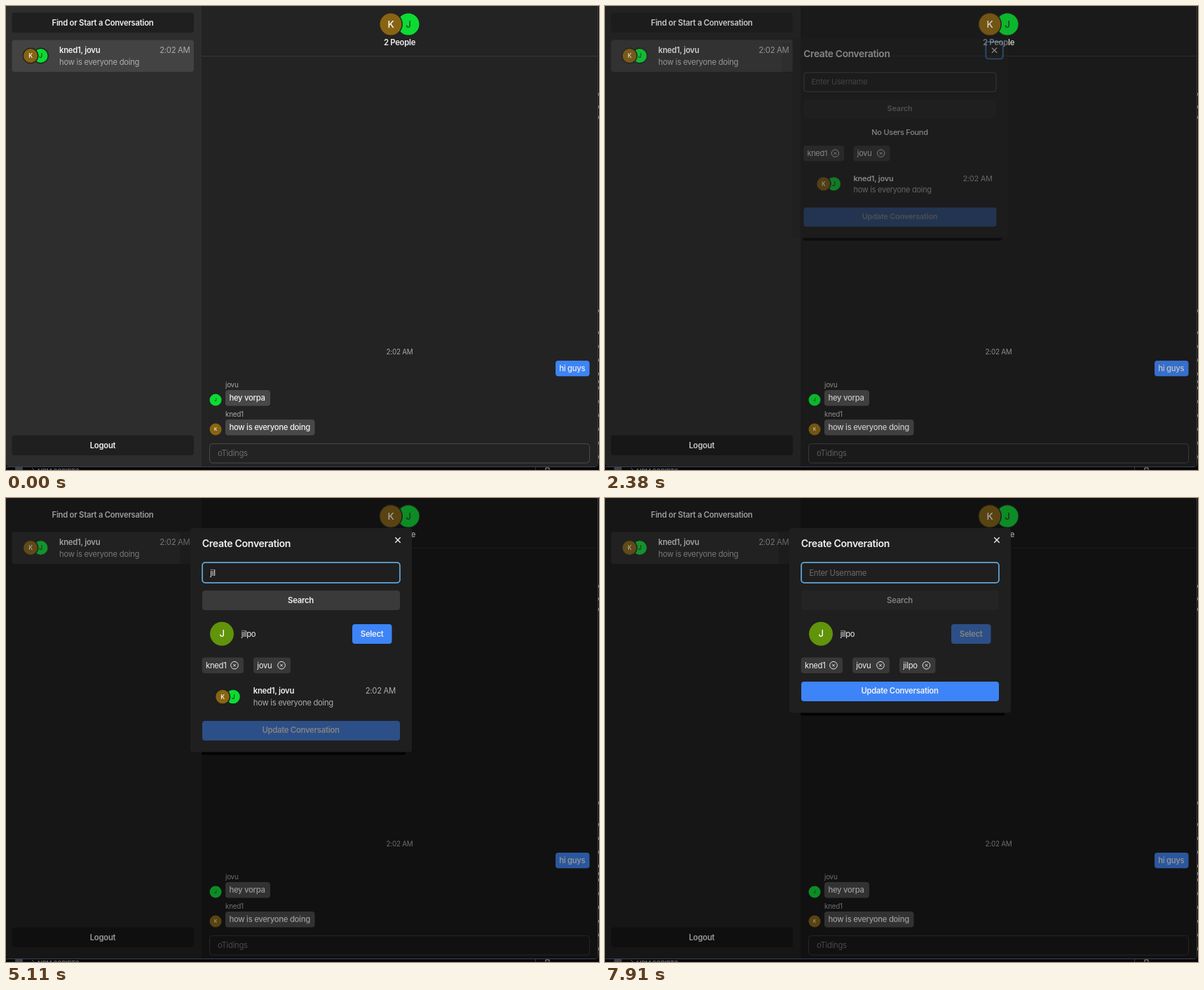
An HTML page for the animation above (8 s loop, 846 by 662 pixels).

```html
<!DOCTYPE html>
<html lang="en">
<head>
<meta charset="utf-8">
<title>Group chat</title>
<style>
  html, body { margin: 0; width: 100%; height: 100%; overflow: hidden; background: #08090d; }
  svg { display: block; width: 846px; height: 662px; }
  text { font: 400 11.28px Inter, "Open Sans", sans-serif; letter-spacing: -.025em; fill: #f0f0f0; white-space: pre; }
  .semi { font-weight: 600; letter-spacing: -.022em; }
  .medium { font-weight: 500; }
  .soft { fill: #adadad; }
  .hint { fill: #6c6c6c; }
  .small { font-size: 9.87px; fill: #a8a8a8; }
</style>
</head>
<body>
<svg id="stage" viewBox="0 0 846 662"></svg>
<script>
const LOOP = 8000, STEP = 70;
const BLUE = '#3d84f8', GREEN = '#0bdb32', BROWN = '#886412', PANEL = '#1f1f1f';
const FIRST = 'kned1', SECOND = 'jovu', THIRD = 'jilpo', QUERY = 'jil';
const GROUP = `${FIRST}, ${SECOND}`, LAST = 'how is everyone doing';

const rect = (x, y, w, h, fill, r = 4, more = '') =>
  `<rect x="${x}" y="${y}" width="${w}" height="${h}" rx="${r}" fill="${fill}" ${more}/>`;
const label = (x, y, str, cls = '', anchor = 'start', more = '') =>
  `<text x="${x}" y="${y}" class="${cls}" text-anchor="${anchor}" ${more}>${str}</text>`;
const centered = (x, y, str, cls = 'semi', more = '') => label(x, y, str, cls, 'middle', more);
const path = (d, stroke = '#f0f0f0', width = 1, more = '') =>
  `<path d="${d}" fill="none" stroke="${stroke}" stroke-width="${width}" ${more}/>`;
const group = (id, body, more = '') => `<g id="${id}" ${more}>${body}</g>`;
const cross = (x, y, r) => `M${x - r} ${y - r}l${2 * r} ${2 * r}m0 ${-2 * r}l${-2 * r} ${2 * r}`;

const avatar = (x, y, r, fill, letter, size, ink = '#fff', ring = 'none') =>
  `<circle cx="${x}" cy="${y}" r="${r}" fill="${fill}" stroke="${ring}" stroke-width="1.4"/>` +
  centered(x, y + size * .36, letter, 'medium', `style="font-size:${size}px;fill:${ink}"`);
const pair = (x, y, r, gap, size, ring, backInk = '#123d18') =>
  avatar(x + gap, y, r, GREEN, 'J', size, backInk, ring) + avatar(x, y, r, BROWN, 'K', size, '#fff', ring);

const summary = (x, y, right) =>
  label(x, y, GROUP, 'semi') + label(right, y, '2:02 AM', 'soft', 'end') + label(x, y + 17.2, LAST, 'soft');

const bubble = (y, name, message, width, face) =>
  label(313, y - 4, name, 'small') + rect(313, y, width, 22.5, '#484848') +
  label(318.5, y + 15.4, message, 'medium') + face;

const chip = (x, width, name) =>
  rect(x, 199.5, width, 22.5, '#383838') + label(x + 5.3, 214.6, name) +
  `<circle cx="${x + width - 13}" cy="210.7" r="5.3" fill="none" stroke="#e6e6e6"/>` +
  path(cross(x + width - 13, 210.7, 1.9), '#e6e6e6');

// Fragments of the desktop around the window
const edgeMarks = [126, 144, 159, 435, ...Array.from({ length: 10 }, (_, i) => 466 + i * 19.7), 536]
  .map(y => rect(845, y - 2, 1, 4, '#808080', 0)).join('');
const desktop = rect(0, 0, 846, 662, '#07080c', 0) + edgeMarks +
  rect(13, 658, 11, 4, '#3c4048', 1) + path('M37 659l3 3', '#666') +
  label(45, 666.5, 'NPM SCRIPTS', 'semi', 'start', 'style="font-size:9px;fill:#666a72"') +
  path('M755.5 658v4', '#333842') + path('M770 662v-3h5v3', '#999');

const surfaces =
  path('M0 657.5h840q4.5 0 4.5-5V0', '#36444d', 1) +
  '<path d="M0 0H279V657H5Q0 657 0 652Z" fill="#2d2d2d"/>' +
  '<path d="M279 0H844V652Q844 657 839 657H279Z" fill="#232323"/>' +
  path('M279 71.5H844', '#393939') +
  rect(8.5, 9.5, 259.5, 28.5, '#1f1f1f', 4, 'id="findBox"') +
  rect(8.5, 48.5, 259.5, 45.5, '#434343') +
  rect(8.5, 612.5, 259.5, 28.5, '#1f1f1f') +
  rect(290.5, 624.5, 542, 27.5, 'none', 4, 'stroke="#4a4a4a"');

const content =
  centered(138, 27.5, 'Find or Start a Conversation') + centered(138, 630.5, 'Logout') +
  pair(35, 71, 10.7, 14.5, 8.5, '#222') + summary(76, 67, 262.5) +
  pair(549, 26, 16.2, 25, 13.5, '#232323', '#174f20') + centered(561.5, 55.6, '2 People') +
  centered(561.5, 496.5, '2:02 AM', 'small') +
  rect(784, 506, 48.5, 22.3, BLUE) + label(789.3, 521.2, 'hi guys', 'medium') +
  bubble(548, SECOND, 'hey vorpa', 64, avatar(299, 562, 8.5, GREEN, 'J', 6, '#123d18')) +
  bubble(590, FIRST, LAST, 127.5, avatar(299, 604, 8.5, BROWN, 'K', 6)) +
  label(302, 642.4, 'oTidings', 'hint');

const menu =
  rect(8.5, 54, 162, 74, '#000', 14, 'opacity=".2"') +
  rect(9, 49.5, 157, 62, '#282828', 4, 'stroke="#585858"') +
  rect(9.5, 55, 156, 25.3, '#525252', 0, 'id="editHover"') +
  rect(9.5, 80.3, 156, 25.3, '#525252', 0, 'id="leaveHover"') +
  '<path d="M19 72l.7-2.8 5.1-5.1 2.1 2.1-5.1 5.1z" fill="#e8e8e8"/>' + path('M20.3 70.7l4.3-4.3', '#444', .8) +
  path('M19.5 90.5h7.4M21.8 90v-1.3h2.8v1.3M20.5 90.5v6.3h5.4v-6.3', '#e8e8e8', 1.1) +
  label(37, 71.8, 'Edit') + label(37, 97.2, 'Leave');

const modal =
  rect(248, 49, 15, 45, '#000', 0, 'opacity=".14"') +
  rect(279, 330, 291, 8.5, '#030303', 2, 'id="shade"') +
  rect(263, 43, 316, 291.5, PANEL, 4, 'id="dialog"') +
  label(279.7, 69.7, 'Create Converation', 'semi', 'start', 'style="font-size:14.1px"') +
  rect(546.5, 47.5, 25, 25, 'none', 4, 'id="closeRing" stroke="#3f78b8" stroke-width="2"') +
  path(cross(559, 60, 3.7), '#f4f4f4', 1.3) +
  rect(280.5, 92.5, 281, 28, 'none', 4, 'stroke="#565656"') +
  rect(280, 92, 282, 29, 'none', 4, 'id="focusRing" stroke="#63b3ed" stroke-width="1.5"') +
  label(291.3, 110.5, 'Enter Username', 'hint', 'start', 'id="hint"') +
  label(291.3, 110.5, '', '', 'start', 'id="typed"') +
  rect(292, 100, 1, 13, '#f0f0f0', 0, 'id="caret"') +
  rect(280, 132, 282, 28, '#3a3a3a', 4, 'id="searchBox"') +
  centered(420.5, 149.5, 'Search', 'semi', 'id="searchText"') +
  centered(420.5, 184, 'No Users Found', 'medium', 'id="empty"') +
  group('result',
    rect(280, 171, 282, 45, '#4c4c4c', 4, 'id="rowHover"') +
    avatar(308, 193.8, 17, '#61930b', 'J', 13) + label(335.8, 197.8, THIRD) +
    group('select', rect(494, 180, 56.5, 28, BLUE) + centered(522.2, 197.5, 'Select'))) +
  group('chips', chip(279.7, 59.3, FIRST) + chip(353, 53, SECOND) + group('newChip', chip(420, 51.5, THIRD))) +
  group('preview', pair(309, 255.5, 10.5, 15, 8.5, PANEL) + summary(352.8, 251.2, 556)) +
  group('update', rect(280, 290, 282, 28, BLUE) + centered(420.5, 307.4, 'Update Conversation'));

const stage = document.getElementById('stage');
stage.innerHTML = desktop + surfaces +
  rect(0, 0, 844, 657, '#000', 4, 'id="backdrop"') +
  group('content', content) + group('menu', menu) + group('modal', modal);

const el = {};
stage.querySelectorAll('[id]').forEach(node => el[node.id] = node);

const ramp = (t, from, span = 210) => {
  const p = Math.min(1, Math.max(0, (t - from) / span));
  return p * p * (3 - 2 * p);
};
const within = (t, from, to) => t >= from && t < to;
const fade = (id, value) => el[id].setAttribute('opacity', value);
const show = (id, on) => fade(id, on ? 1 : 0);
const shift = (id, y) => el[id].setAttribute('transform', `translate(0 ${y})`);
const zoom = (id, x, y, k) =>
  el[id].setAttribute('transform', `translate(${x} ${y}) scale(${k}) translate(${-x} ${-y})`);

function draw(t) {
  // Context menu
  const opened = ramp(t, 840);
  fade('menu', opened * (1 - ramp(t, 2100)));
  zoom('menu', 9, 49, .8 + .2 * opened);
  show('leaveHover', t < 1190);
  fade('editHover', ramp(t, 1750, 140));

  // Dialog and dimmed page
  const dim = ramp(t, 2240, 280);
  fade('backdrop', .5 * dim);
  fade('content', 1 - .39 * dim);
  fade('findBox', 1 - dim);
  fade('modal', dim);
  zoom('modal', 421, 188, .95 + .05 * dim);

  // Search field
  const focus = ramp(t, 3220) - ramp(t, 6020, 280) + ramp(t, 7210, 280);
  fade('closeRing', 1 - ramp(t, 3220));
  fade('focusRing', focus);
  const count = t < 3990 || t >= 6720 ? 0 : t < 4200 ? 1 : t < 4550 ? 2 : 3;
  el.typed.textContent = QUERY.slice(0, count);
  show('hint', !count);
  el.caret.setAttribute('x', count ? 291.3 + el.typed.getComputedTextLength() : 292);
  show('caret', within(t, 3290, 3850) || within(t, 3990, 5050) || within(t, 5600, 6090) || within(t, 7280, 7840));
  const ready = ramp(t, 3920) - ramp(t, 6650);
  fade('searchBox', .2 + .8 * ready);
  fade('searchText', .45 + .55 * ready);

  // Search result, chips and update button
  const found = t >= 4900, picked = t >= 6720;
  const push = found ? 28 : 0, pull = picked ? 56 : 0;
  show('empty', !found);
  show('result', found);
  show('rowHover', within(t, 5600, 7000));
  fade('select', 1 - .52 * ramp(t, 6650));
  show('newChip', picked);
  show('preview', !picked);
  fade('update', .48 + .52 * ramp(t, 6650));
  shift('chips', push);
  shift('preview', push);
  shift('update', push - pull);
  shift('shade', push - pull);
  el.dialog.setAttribute('height', 291.5 + push - pull);
}

const start = performance.now();
function tick() {
  const t = (performance.now() - start) % LOOP;
  draw(Math.floor(t / STEP) * STEP);
  requestAnimationFrame(tick);
}
tick();
</script>
</body>
</html>
```
